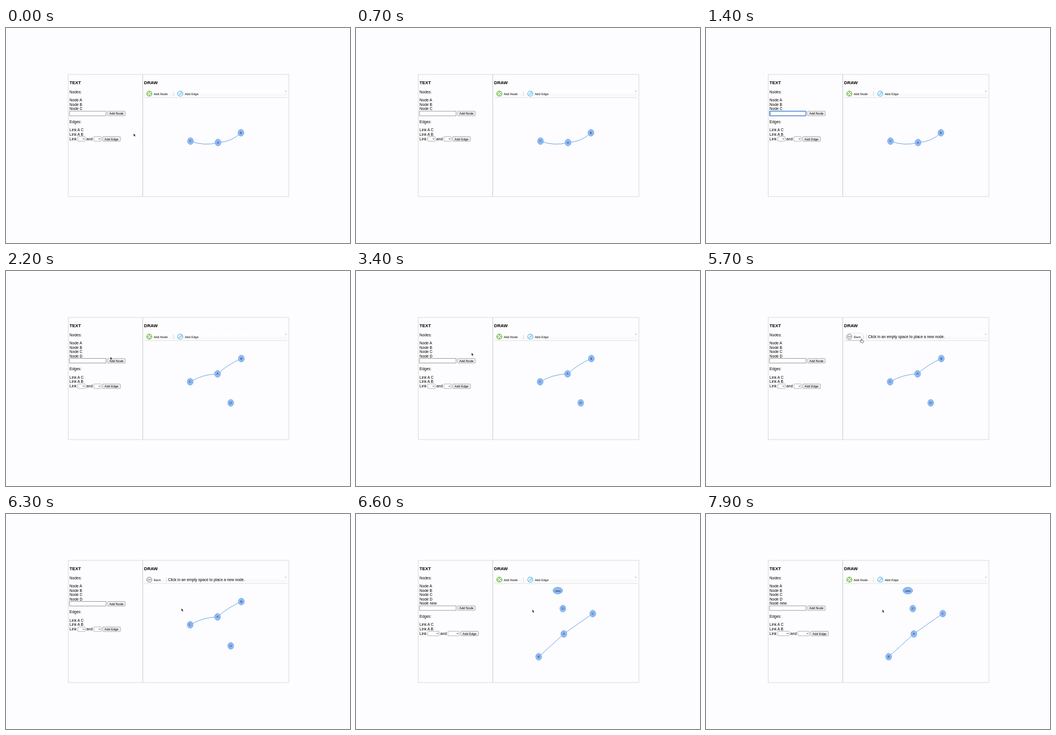
An HTML page that plays this animation: 600x375 px, repeating every 8 s.

```html
<!DOCTYPE html>
<html lang="en">
<head>
<meta charset="utf-8">
<title>Text and draw graph editor</title>
<style>
  html, body { margin: 0; width: 100%; height: 100%; overflow: hidden; background: #fdfcfe; }
  svg { display: block; width: 600px; height: 375px; font: 6.667px "Liberation Sans", Arial, sans-serif; }
  .head { font-size: 7.8px; font-weight: bold; }
  .btn { font-size: 5.55px; }
  .tool { font: 5px "DejaVu Sans", Verdana, sans-serif; }
  .label { font-size: 5.83px; fill: #343434; text-anchor: middle; }
</style>
</head>
<body>
<svg id="stage" viewBox="0 0 600 375"></svg>
<script>
const LOOP = 8000, STEP = 100;
const stage = document.getElementById('stage');

// Graph layouts: nodes are [x, y]; edges are [from, to, control x, control y].
const graphs = [
  { nodes: { C: [321.8, 197.3], A: [369.8, 199.8], B: [409.8, 182.7] },
    edges: [['C', 'A', 346, 206.5], ['A', 'B', 394, 198.5]] },
  { nodes: { C: [321.2, 193.2], A: [369, 179.4], B: [410.5, 152.7], D: [392, 230] },
    edges: [['C', 'A', 343, 180.2], ['A', 'B', 386, 163.5]] },
  { nodes: { C: [413, 173.8], A: [362.5, 209.2], B: [318.6, 249], D: [360.8, 165], new: [352, 133.6] },
    edges: [['C', 'A', 387.5, 191], ['A', 'B', 340.5, 229.2]] },
];

// Pointer legs: start time, end time, destination.
const start = [222.6, 183.8];
const legs = [
  [0, 900, 150, 149],
  [1400, 1800, 182, 149.6],
  [3000, 4300, 268.6, 118],
  [4900, 5300, 269.6, 116.2],
  [5600, 6400, 307.6, 166.6],
];

function pointerAt(t) {
  let [x, y] = start;
  for (const [from, to, tx, ty] of legs) {
    const p = Math.min(1, Math.max(0, (t - from) / (to - from)));
    const e = p * p * (3 - 2 * p);
    x += (tx - x) * e;
    y += (ty - y) * e;
  }
  return [x, y];
}

const text = (x, y, s, cls = '') => `<text x="${x}" y="${y}" class="${cls}">${s}</text>`;
const rect = (x, y, w, h, fill, stroke = 'none', sw = 0.5, r = 0) =>
  `<rect x="${x}" y="${y}" width="${w}" height="${h}" rx="${r}" fill="${fill}" stroke="${stroke}" stroke-width="${sw}"/>`;
const path = (d, stroke, w = 0.6, fill = 'none') =>
  `<path d="${d}" fill="${fill}" stroke="${stroke}" stroke-width="${w}" stroke-linejoin="round"/>`;
const circle = (x, y, r, stroke, w, fill = '#fff') =>
  `<circle cx="${x}" cy="${y}" r="${r}" fill="${fill}" stroke="${stroke}" stroke-width="${w}"/>`;

const button = (x, y, s) =>
  rect(x, y, 31, 8, '#efefef', '#767676', 0.55, 1) + text(x + 3.2, y + 6, s, 'btn');

const select = (x, y, w) =>
  rect(x, y, w, 7.9, '#fff', '#767676', 0.55, 1) +
  path(`M${x + w - 4.6} ${y + 3.2}l1.4 1.5 1.4-1.5`, '#111', 0.8);

function textPanel(t, names) {
  const y = 128.2 + 7.5 * names.length;
  const focused = t >= 1000 && t < 1900;
  const typed = t >= 1500 && t < 1900;
  const wide = names.includes('new') ? 20 : 13;
  const second = 125.2 + wide + 15;
  let out = text(110.8, 98.2, 'TEXT', 'head') + text(110.8, 113.9, 'Nodes:');
  names.forEach((n, i) => out += text(110.8, 128.2 + 7.5 * i, 'Node ' + n));

  const top = y - 5.6;
  out += focused
    ? rect(110.8, top, 63.6, 8, '#fff', '#2f74d0', 1.2, 0.8)
    : rect(110.8, top, 63.6, 8, '#fff', '#767676', 0.7);
  if (typed) out += text(112.2, y + 0.4, 'D', 'btn');
  if (focused) out += path(`M${typed ? 116.6 : 112.6} ${top + 1.4}v5.4`, '#222', 0.5);
  out += button(177, top, 'Add Node');

  out += text(110.8, y + 15, 'Edges:') + text(110.8, y + 29.4, 'Link A C') +
    text(110.8, y + 36.9, 'Link A B') + text(110.8, y + 44.9, 'Link');
  out += select(125.2, y + 38.8, wide) + text(127 + wide, y + 44.9, 'and') +
    select(second, y + 38.8, wide) + button(second + wide + 2.4, y + 38.8, 'Add Edge');
  return out;
}

function nodeIcon() {
  return circle(250, 114.5, 4.4, '#70b947', 1.3) + circle(250, 114.5, 2.3, '#8ac767', 0.7) +
    path('M250 110.8v2.3m0 2.8v2.3M246.3 114.5h2.3m2.8 0h2.3', '#58a52f', 1.1);
}

function edgeIcon() {
  return circle(304, 114.5, 4.4, '#62bbea', 1.3) +
    path('M301.4 117.2l2.2-2.2', '#3ba5df', 1) +
    path('M303.2 115.6l.2-2.3 3.2-1.2-.8 3.2z', '#3ba5df', 0.6, '#e4f4fc');
}

function backIcon() {
  return circle(250, 114.5, 4.4, '#555', 0.8) +
    path('M247 114.5l2-1.7v1h3.6v1.4h-3.6v1z', '#444', 0.5);
}

const pill = w => `<g filter="url(#shadow)">${rect(244, 109, w, 11, '#fdfdfd', 'none', 0, 5.5)}</g>`;

function toolbar(placing, x, y) {
  const w = placing ? 30 : 42;
  const hover = x > 244 && x < 244 + w && y > 109 && y < 120;
  let out = text(240.8, 98.2, 'DRAW', 'head') + rect(241, 108.5, 250, 13, 'url(#bar)') +
    rect(241, 121.3, 250, 0.6, '#d0d3d2') + path('M487 109.4l2 2m0-2l-2 2', '#999', 0.7);
  if (hover) out += pill(w);
  out += placing
    ? backIcon() + text(258, 116.5, 'Back', 'tool') + rect(279.6, 110, 0.6, 9, '#c4c4c4') +
      text(282.7, 116.6, 'Click in an empty space to place a new node.')
    : nodeIcon() + text(257.7, 116.5, 'Add Node', 'tool') + rect(291.7, 110, 0.6, 9, '#cbc5b8') +
      edgeIcon() + text(312, 116.5, 'Add Edge', 'tool');
  return [out, hover];
}

function drawGraph({ nodes, edges }) {
  let out = '';
  for (const [a, b, cx, cy] of edges)
    out += path(`M${nodes[a]}Q${cx} ${cy} ${nodes[b]}`, '#4a92df', 0.8);
  for (const [name, [x, y]] of Object.entries(nodes)) {
    const rx = name.length > 1 ? 8.5 : 5.2;
    out += `<ellipse cx="${x}" cy="${y}" rx="${rx}" ry="6" fill="#8fbbf7" stroke="#5596ea" stroke-width=".6"/>` +
      text(x, y + 2, name, 'label');
  }
  return out;
}

function drawPointer(x, y, hand) {
  const shape = hand
    ? path('M-.6 .4q.6-.9 1.2 0v2l2.4.6q.7.3.5 1.2l-.6 2.6h-3.2l-2-2.6q0-.9.8-.6l.9.7z', '#222', 0.6, '#fff')
    : path('M0 0v5.3l1.2-1.1.9 2 .9-.4-.9-1.9h1.6z', '#fff', 0.5, '#000');
  return `<g transform="translate(${x} ${y})">${shape}</g>`;
}

const defs = `<defs>
  <linearGradient id="bar" x2="0" y2="1"><stop stop-color="#fff"/><stop offset=".48" stop-color="#fcfcfc"/>
  <stop offset=".5" stop-color="#f8f8f8"/><stop offset="1" stop-color="#fbfbfb"/></linearGradient>
  <filter id="shadow" x="-20%" y="-60%" width="140%" height="220%">
  <feDropShadow dx=".4" dy=".4" stdDeviation="1.2" flood-opacity=".3"/></filter></defs>`;
const frame = rect(108.5, 81, 384.8, 213, 'none', '#d2d2d4', 0.8) + rect(238, 81, 0.8, 213, '#bdbdc0');

function render(t) {
  const graph = graphs[t < 1900 ? 0 : t < 6600 ? 1 : 2];
  const names = Object.keys(graph.nodes).sort((a, b) => (a === 'new') - (b === 'new') || (a < b ? -1 : 1));
  const [x, y] = pointerAt(t);
  const [bar, hover] = toolbar(t >= 5000 && t < 6600, x, y);
  const overInput = x < 174.5;
  stage.innerHTML = defs + frame + textPanel(t, names) + bar + drawGraph(graph) +
    (overInput ? '' : drawPointer(x, y, hover));
}

let last = -1;
function tick() {
  const t = Math.floor(performance.now() % LOOP / STEP) * STEP;
  if (t !== last) render(last = t);
  requestAnimationFrame(tick);
}
tick();
</script>
</body>
</html>
```
